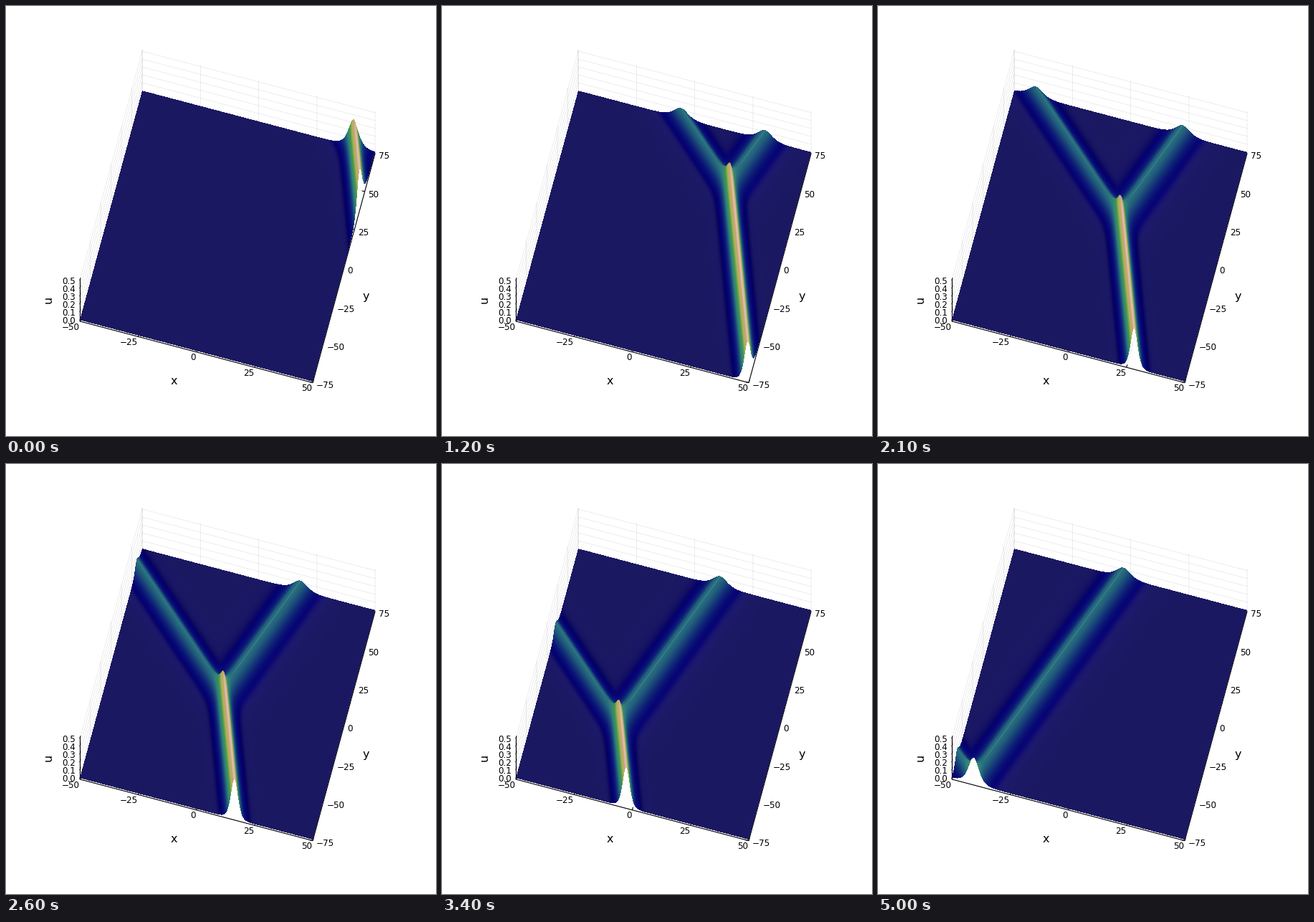
These frames come from a looping animation (600 by 600 pixels, 5.05 s). A matplotlib script:

```python
import numpy as np
import matplotlib
import matplotlib.pyplot as plt
from matplotlib.animation import FuncAnimation

# Resonant Y-shaped line soliton of the KP equation, seen from above
K = np.array([-5, -1, 3]) / 8
FRAMES, STEP = 101, 50

# Orthographic camera on a box with edges of BOX pixels
AZ, EL = np.radians(15), np.radians(80)
BOX = 336.5
CX, CY = 309.05, 293.5
LO = np.array([-50, -75, -0.015])
SPAN = np.array([100, 150, 0.53])
XV = BOX * np.array([np.cos(AZ), np.sin(AZ) * np.sin(EL)])
YV = BOX * np.array([np.sin(AZ), -np.cos(AZ) * np.sin(EL)])
ZV = BOX * np.array([0, -np.cos(EL)])
ORIGIN = np.array([CX, CY]) - (XV + YV + ZV) / 2
VIEW = np.array([np.cos(EL) * np.sin(AZ), -np.cos(EL) * np.cos(AZ), np.sin(EL)])

# Surface colour: map position at u = 0, its growth with u, and a soft gloss
TONE0, TONE_RATE = 0.0146, 1.77
GLOSS, SHINE = 0.114, 10


def project(x, y, z):
    a, b, c = (np.array([x, y, z]) - LO) / SPAN
    return ORIGIN + a * XV + b * YV + c * ZV


def weights(x, y, t):
    """Relative weights of the three exponentials."""
    def term(k):
        d = K[1]
        return np.exp((k - d) * x - (k**2 - d**2) * y + (k**3 - d**3) * t)
    e0, e2 = term(K[0]), term(K[2])
    total = 1 + e0 + e2
    return e0 / total, 1 / total, e2 / total


def height(p):
    # K is evenly spaced by 1/2, so the variance only needs the outer weights
    return 0.5 * (p[0] + p[2] - (p[2] - p[0])**2)


def slopes(p):
    mean = sum(w * k for w, k in zip(p, K))
    mean2 = sum(w * k * k for w, k in zip(p, K))
    ux = 2 * sum(w * (k - mean)**3 for w, k in zip(p, K))
    uy = -2 * sum(w * (k - mean)**2 * (k * k - mean2) for w, k in zip(p, K))
    return ux, uy


# Screen columns (two per pixel, the odd ones through pixel centres)
# and the ground points behind each of them
C0, C1, R0, R1 = 103, 516, 90, 530
cols = np.arange(C0, C1, 0.5)
cols = cols[(cols > ORIGIN[0]) & (cols < ORIGIN[0] + XV[0] + YV[0])]
first = int(round((cols[0] - C0) * 2))
rows = np.arange(R0, R1) + 0.5
off = cols - ORIGIN[0]
far = np.clip(off / YV[0], 0, 1)
near = np.clip((off - XV[0]) / YV[0], 0, 1)
depth = far + (near - far) * np.linspace(0, 1, 340)[:, None]


def ground(d, offset):
    a = (offset - d * YV[0]) / XV[0]
    return a, LO[0] + SPAN[0] * a, LO[1] + SPAN[1] * d


A, GX, GY = ground(depth, off)
BASE = ORIGIN[1] + A * XV[1] + depth * YV[1] - LO[2] / SPAN[2] * ZV[1]
RISE = -ZV[1] / SPAN[2]
LUT = matplotlib.colormaps["gist_earth"](np.linspace(0, 1, 2048))[:, :3]
LEVELS = np.linspace(0, 1, 256)
EARTH = matplotlib.colormaps["gist_earth"](np.arange(256))[:, :3]
LUT = np.stack([np.interp(np.linspace(0, 1, 2048), LEVELS, EARTH[:, i])
                for i in range(3)], axis=1)


def shade(x, y, t):
    p = weights(x, y, t)
    ux, uy = slopes(p)
    sx, sy = ux * SPAN[0] / SPAN[2], uy * SPAN[1] / SPAN[2]
    facing = (VIEW[2] - sx * VIEW[0] - sy * VIEW[1]) / np.sqrt(1 + sx**2 + sy**2)
    gloss = GLOSS * np.maximum(facing, 0)**SHINE
    tone = np.clip((TONE0 + TONE_RATE * height(p)) * 2047, 0, 2047).astype(int)
    return np.clip(LUT[tone] + gloss[:, None], 0, 1)


def render(t):
    rowpos = BASE - RISE * height(weights(GX, GY, t))
    # the nearest surface point on each sight line hides those behind it
    front = np.minimum.accumulate(rowpos[::-1])[::-1]
    hit = np.empty((len(rows), len(cols)))
    for j in range(len(cols)):
        hit[:, j] = np.interp(rows, front[:, j], depth[:, j],
                              left=np.nan, right=np.nan)
    r, c = np.nonzero(~np.isnan(hit))
    _, x, y = ground(hit[r, c], off[c])
    fine = np.zeros((len(rows), 2 * (C1 - C0), 4))
    fine[r, c + first, :3] = shade(x, y, t)
    fine[r, c + first, 3] = 1
    out = fine[:, ::2] + fine[:, 1::2]
    out[..., :3] /= np.maximum(out[..., 3:], 1)
    out[..., 3] = fine[:, 1::2, 3]
    return out


fig = plt.figure(figsize=(6, 6), dpi=100, facecolor="white")
ax = fig.add_axes([0, 0, 1, 1])
ax.axis("off")
plt.rcParams["font.family"] = "DejaVu Sans"
PX = 0.72


def line(p, q, **style):
    ax.plot([p[0], q[0]], [p[1], q[1]], **style)


def label(x, y, s, size=12, **kw):
    ax.text(x, y, s, fontsize=size * PX, color="black", va="baseline",
            rotation_mode="anchor", zorder=5, **kw)


def minus(v):
    return str(v).replace("-", "\u2212")


XT = range(-50, 51, 25)
YT = range(-75, 76, 25)
ZT = [0, 0.1, 0.2, 0.3, 0.4, 0.5]
X0, Y0, Z0 = LO
X1, Y1, Z1 = LO + SPAN

grid = dict(color="black", alpha=0.1, lw=0.5, zorder=1, snap=False)
for v in XT:
    line(project(v, Y1, Z0), project(v, Y1, Z1), **grid)
    line(project(v, Y0, Z0), project(v, Y1, Z0), **grid)
for v in YT:
    line(project(X0, v, Z0), project(X0, v, Z1), **grid)
    line(project(X0, v, Z0), project(X1, v, Z0), **grid)
for v in ZT:
    line(project(X0, Y1, v), project(X1, Y1, v), **grid)
    line(project(X0, Y0, v), project(X0, Y1, v), **grid)

ink = dict(color="black", lw=0.8, zorder=2, solid_capstyle="butt")
corner = project(X0, Y0, Z0)
right = project(X1, Y0, Z0)
line(corner, right, **ink)
line(right, project(X1, Y1, Z0), **ink)
line(corner, project(X0, Y0, Z1), **ink)

along_x = 4 * XV / np.hypot(*XV)
along_y = 4 * YV / np.hypot(*YV)
for v in XT:
    p = project(v, Y0, Z0)
    line(p, p + along_y, **ink)
    label(p[0] - 0.5, p[1] + 11.7, minus(v), ha="right")
for v in YT:
    p = project(X1, v, Z0)
    line(p, p - along_x, **ink)
    label(p[0] + 5, p[1] + 7.6, minus(v), ha="left")
for v in ZT:
    p = project(X0, Y0, v)
    line(p, p + along_y, **ink)
    label(97, p[1] + 4.4, f"{v:.1f}", ha="right")

label(234.5, 527.5, "x", 16, ha="center")
label(502, 410, "y", 16, ha="center")
label(63.5, 410, "u", 16, ha="center", rotation=90)

surface = ax.imshow(np.zeros((R1 - R0, C1 - C0, 4)), extent=(C0, C1, R1, R0),
                    interpolation="nearest", aspect="auto", zorder=3)
ax.set_xlim(0, 600)
ax.set_ylim(600, 0)


def update(i):
    surface.set_data(render(4 * i - 200))
    return (surface,)


anim = FuncAnimation(fig, update, frames=FRAMES, interval=STEP,
                     repeat=True, repeat_delay=0, blit=False)
plt.show()
```
